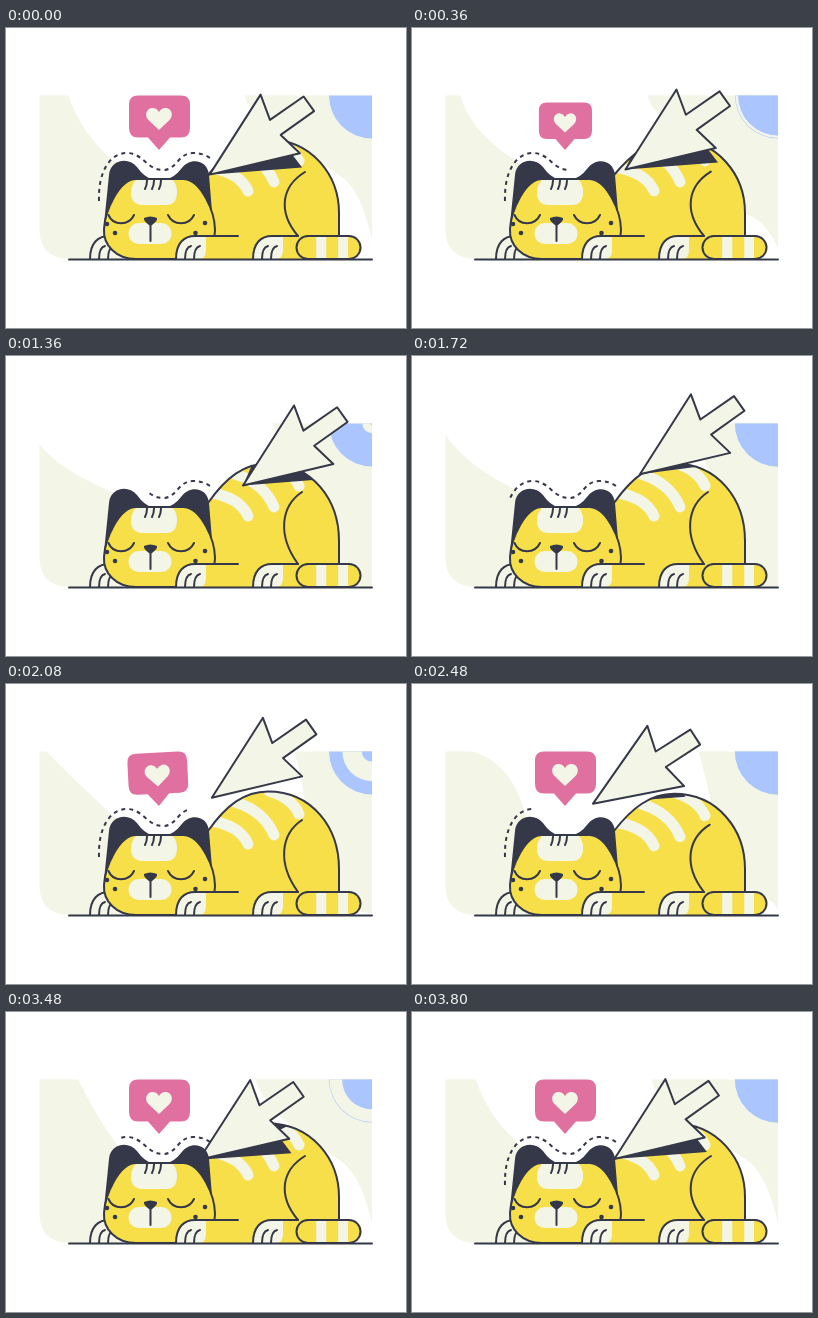
Write an HTML page that moves like this. It is 400 px wide and 300 px high and loops after 3840 ms.

```html
<!DOCTYPE html>
<html lang="en">
<head>
<meta charset="utf-8">
<title>Petting a sleeping cat</title>
<style>
  html, body { margin: 0; width: 100%; height: 100%; overflow: hidden; background: #fff; }
  svg { display: block; width: 400px; height: 300px; }
  .ink { fill: none; stroke: #353848; stroke-width: 2; stroke-linecap: round; stroke-linejoin: round; }
  .dark { fill: #353848; }
  .cream { fill: #f3f5e6; }
  .yellow { fill: #f6df48; }
  .blue { fill: #abc6ff; }
  .stripe { fill: none; stroke: #f3f5e6; stroke-width: 11; stroke-linecap: round; }
</style>
</head>
<body>
<svg viewBox="0 0 400 300">
  <defs>
    <clipPath id="panel"><path d="M33.500 67.500H366V231H63Q33.500 230 33.500 201Z"/></clipPath>
    <clipPath id="bodyClip"><path id="bodyShape"/></clipPath>
    <polygon id="pointer" points="0,0 88,-35.500 81,-9.500 122,-9 122,9 81,9 86,35"/>
    <g id="paw">
      <path class="cream" d="M0 231C0 215 8 208 19 208H30V222Q30 231 23 231Z"/>
      <path class="ink" d="M0 231C0 215 8 208 19 208M9 231C9 224 11 219 15 218M18 231C18 224 20 219 24 218"/>
    </g>
  </defs>

  <g clip-path="url(#panel)">
    <path id="leftField" class="cream"/>
    <path id="rightField" class="cream"/>
    <g transform="translate(366 67.500)">
      <circle class="blue" r="43"/>
      <circle id="hole" class="cream"/>
      <circle id="core" class="blue"/>
    </g>
  </g>

  <g id="bubble">
    <path fill="#e0709f" d="M132 67.500H175Q184 67.500 184 76.500V100Q184 109.500 175 109.500H164L153 122L142 109.500H132Q123 109.500 123 100V76.500Q123 67.500 132 67.500Z"/>
    <path class="cream" d="M153 102L142.500 92C137 86 142 79 147.500 80Q151 80.500 153 84Q155 80.500 158.500 80C164 79 169 86 163.500 92Z"/>
  </g>

  <path id="trail" class="ink" style="stroke-linecap:butt"
        d="M93 173C92 142 105 125 121 125C137 125 141 142 157 142C171 142 172 125 187 125Q197 125 204 130"/>

  <g clip-path="url(#bodyClip)">
    <path class="yellow" d="M98 100H340V232H98Z"/>
    <g id="stripes" class="stripe">
      <path d="M206 137Q234 142 242 160"/>
      <path d="M229 118Q258 127 268 151"/>
      <path d="M263 107Q286 114 293 130"/>
    </g>
    <g class="dark"><use id="shadeRight" href="#pointer"/><use id="shadeLeft" href="#pointer"/></g>
  </g>
  <path id="bodyLine" class="ink"/>
  <path id="haunch" class="ink"/>
  <use id="arrow" href="#pointer" class="ink" style="fill:#f3f5e6"/>

  <use href="#paw" x="84"/>
  <path class="dark" d="M98 196L103 147C104 132 122 128 131 139Q138 149 146 151H160Q168 150 175 141C184 128 202 132 203 147L207 196Z"/>
  <path class="ink" style="fill:#f6df48" d="M98 201C99 183 113 151 130 151H178C195 152 209 184 209 202C209 220 195 231 178 231H130C110 231 97 217 98 201Z"/>
  <path class="cream" d="M130 152H167Q171 157 171 164Q171 177 160 177H137Q125 177 125 165Q125 157 130 152Z"/>
  <path class="ink" d="M141 152.500Q141 157 139 161M148 152.500Q148 157 146 161M155 152.500Q155 157 153 161"/>
  <rect class="cream" x="122.500" y="195" width="43" height="21" rx="10"/>
  <path class="ink" d="M102.500 187C107 198 123 198 128 187M162 187C167 198 183 198 188 187M144.500 195V213"/>
  <path class="dark" d="M138 190Q144.500 187 151 190Q152 193 144.500 198Q137 193 138 190Z"/>
  <g class="dark">
    <circle cx="101" cy="196" r="2.300"/><circle cx="109" cy="205" r="2.300"/>
    <circle cx="189.500" cy="205" r="2.300"/><circle cx="199" cy="195" r="2.300"/>
  </g>

  <path class="yellow" d="M189 208H232V231H189Z"/>
  <use href="#paw" x="170"/>
  <use href="#paw" x="247"/>
  <path class="ink" d="M189 208H232M266 208H292M63 231.500H366"/>

  <g id="tail" fill="none" stroke-linecap="round">
    <path stroke="#353848" stroke-width="25"/>
    <path stroke="#f6df48" stroke-width="21"/>
    <path stroke="#f3f5e6" stroke-width="21" stroke-linecap="butt" stroke-dasharray="0 8 10 12 10 99"/>
  </g>
</svg>

<script>
const LOOP = 3840, RING = 640, TRAIL = 1920;
const STROKE_START = 2840, STROKE_END = 1360;
const $ = id => document.getElementById(id);
const draw = (id, d) => $(id).setAttribute('d', d);
const place = (id, transform) => $(id).setAttribute('transform', transform);

const ramp = (t, a, b) => Math.min(1, Math.max(0, (t - a) / (b - a)));
const ease = u => (1 - Math.cos(Math.PI * u)) / 2;
const wave = (t, peak) => Math.cos(2 * Math.PI * (t - peak) / LOOP);

// Bell around a moment of the loop.
function bump(t, centre, width) {
  const gap = Math.abs(t - centre);
  return Math.exp(-((Math.min(gap, LOOP - gap) / width) ** 2));
}

// Rises from 0 to 1 over a..b and falls back over c..d, wrapping round the loop.
function pulse(t, a, b, c, d) {
  const s = t < a ? t + LOOP : t;
  return ease(ramp(s, a, b)) - ease(ramp(s, c, d));
}

function drawFields(t) {
  const left = 48 + 26 * wave(t, 3240), bulge = bump(t, 2650, 600);
  draw('leftField', `M0 231V67H${left}Q${left + 12 + 36 * bulge} ${109 - 36 * bulge} 116 140V231Z`);
  const right = 262 - 27 * wave(t, 300), foot = pulse(t, 1800, 3600, LOOP, LOOP + 760);
  const y = 231 - 84 * foot;
  draw('rightField', `M366 67H${right}Q${right + 8} 95 300 125L333 ${y}Q354 ${y + 12 * foot} 366 ${231 - 20 * foot}Z`);
}

function drawRings(t) {
  const p = t % RING / RING;
  $('hole').setAttribute('r', 42.5 * ease(ramp(p, 0, 0.4)));
  $('core').setAttribute('r', 43 * ease(ramp(p, 0.05, 0.67)));
}

function drawBody(t) {
  const b = pulse(t, 200, 1400, 2080, 2800), top = 111.5 - 4 * b, h = 144 - 8 * b;
  const back = `M202 147C220 ${top + 14} 238 ${top} 262 ${top}C306 ${top} 333 ${top + 36} 333 185V208`;
  draw('bodyLine', back);
  draw('bodyShape', `${back}V231H180V170Z`);
  draw('haunch', `M${299 - 3 * b} ${h}C${276 - b} ${h + 14} 271 ${183 - 4 * b} 292 208`);
  place('stripes', `translate(0 ${3 - 3 * b})`);
}

// The tip slides along the back, pressing down, then returns through the air.
function tipAt(t) {
  const span = (STROKE_END - STROKE_START + LOOP) % LOOP;
  const since = (t - STROKE_START + LOOP) % LOOP;
  if (since < span) {
    const u = since / span, p = u * (1.25 - 0.25 * u);
    const press = Math.sin(Math.PI * p) + 0.25 * Math.sin(2 * Math.PI * p);
    return [172 + 65 * p, 132 - 2.5 * p + 15.5 * press];
  }
  const u = (since - span) / (LOOP - span);
  return [237 - 65 * ease(u), 129.5 + 2.5 * u - 17 * Math.sin(Math.PI * u)];
}

function drawArrow(t) {
  const [x, y] = tipAt(t);
  const angle = 35.5 - 7 * bump(t, STROKE_START, 350);
  const spread = 9 * (1 - bump(t, 2080, 350));
  const turned = turn => `translate(${x} ${y}) rotate(${turn - angle})`;
  place('arrow', turned(0));
  place('shadeRight', turned(spread));
  place('shadeLeft', turned(-spread));
}

function drawTrail(t) {
  const p = t % TRAIL, length = $('trail').getTotalLength();
  const start = p < 915 ? 0 : 1 - ramp(p, 915, 1880);
  const end = p < 915 ? 1 - ramp(p, 15, 915) : 1;
  const from = Math.ceil(start * length / 8) * 8;
  const count = Math.max(0, Math.ceil((end * length - from) / 8));
  $('trail').setAttribute('stroke-dasharray', `0 ${from} ${'4 4 '.repeat(count)}0 999`);
  $('trail').style.visibility = count ? 'visible' : 'hidden';
}

function drawBubble(t) {
  const size = pulse(t, 1700, 2120, LOOP + 300, LOOP + 560);
  const tilt = t < 1000 ? 0 : -22 * (1 - ease(ramp(t, 1700, 2200)));
  place('bubble', `translate(153 122) rotate(${tilt}) scale(${size}) translate(-153 -122)`);
}

function drawTail(t) {
  const lift = pulse(t, 2500, 2800, 2880, 3240);
  const d = `M${302 + 6.5 * lift} ${219.5 - 17.5 * lift}Q${323 - 3 * lift} ${219.5 - 3 * lift} 343 219.500`;
  for (const path of $('tail').children) path.setAttribute('d', d);
}

function frame() {
  const t = performance.now() % LOOP;
  for (const part of [drawFields, drawRings, drawBody, drawArrow, drawTrail, drawBubble, drawTail]) part(t);
  requestAnimationFrame(frame);
}
frame();
</script>
</body>
</html>
```
